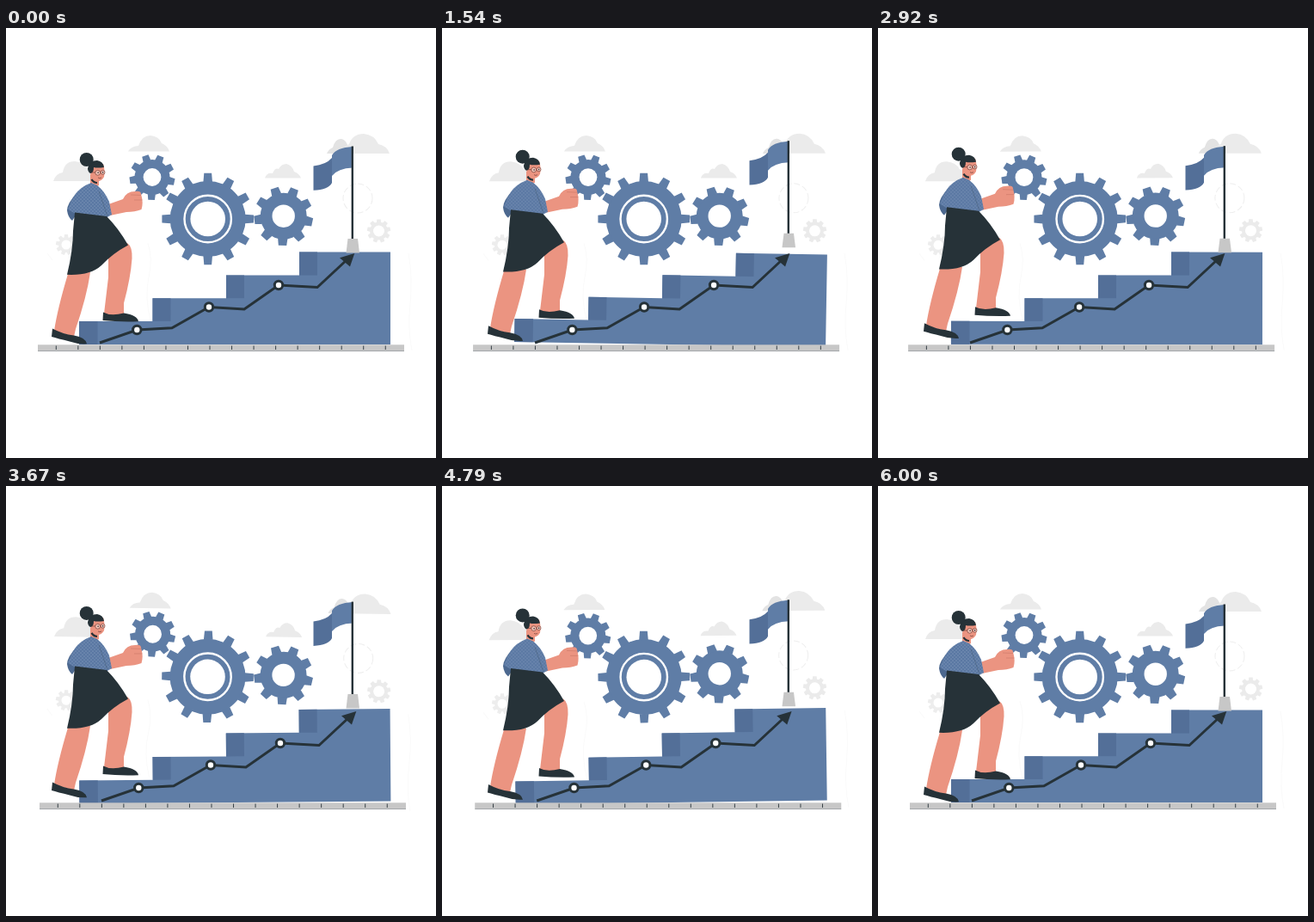
An HTML page that plays this animation: 500 px wide and 500 px high, repeating every 6.04 s.

```html
<!DOCTYPE html>
<html lang="en">
<head>
<meta charset="utf-8">
<title>Climbing the steps</title>
<style>
html, body { margin: 0; width: 100%; height: 100%; overflow: hidden; background: #fff; }
svg { display: block; width: 100vw; height: 100vh; }
.blue { fill: #5f7da6; }
.deep { fill: #536f98; }
.dark { fill: #263238; }
.skin { fill: #eb9481; }
.line { fill: none; stroke: #263238; }
</style>
</head>
<body>
<svg viewBox="0 0 500 500">
  <defs>
    <pattern id="dots" width="4" height="4" patternUnits="userSpaceOnUse">
      <rect width="4" height="4" fill="#5a78a3"/>
      <circle cx="1" cy="1" r=".5" fill="#a9bad3"/>
      <circle cx="3" cy="3" r=".5" fill="#a9bad3"/>
    </pattern>
  </defs>

  <g id="sky">
    <g fill="#ebebeb">
      <path d="M55 178Q58 169 66 168Q68 155 80 155Q91 156 95 164Q103 166 104 178Z"/>
      <path d="M142 143.5Q146 137 154 137Q158 125 168 125Q178 126 181 134Q188 137 190 143.5Z"/>
      <path d="M301 174.5Q303 168 310 169Q313 162 317 164Q320 158 326 158Q333 160 335 167Q341 169 343 174.5Z"/>
      <path d="M373 146Q375 141 380 139Q383 128 390 129Q397 130 400 146Z" fill="#e3e3e3"/>
      <path d="M390 146Q392 138 399 135Q403 123 416 123Q428 124 433 135Q443 137 446 146Z"/>
    </g>
    <g id="faint"></g>
    <circle cx="409" cy="198" r="17" fill="none" stroke="#eee" stroke-dasharray="7 3"/>
    <g fill="none" stroke="#fafafa">
      <path d="M165 250Q171 268 166 290T168 340M48 262L54 270M468 262Q473 290 470 320T472 375"/>
    </g>
  </g>

  <g id="gears"></g>

  <g id="stairs">
    <path class="blue" d="M85 341H170.5V314.3H256V287.4H341V260.5H447V368H85Z"/>
    <path class="deep" d="M85 341h21.5v27H85ZM170.5 314.3h21v26.7h-21ZM256 287.4h21v26.9h-21ZM341 260.5h21v26.9h-21Z"/>
  </g>

  <g id="flag">
    <path class="deep" d="M357.5 160.5Q372 159 379 151V180Q375 188 357.5 188.8Z"/>
    <path class="blue" d="M379 158V148Q384 139 403 138V162.5Q386 163 379 172Z"/>
    <path class="dark" d="M401.6 137.5H404V246H401.6Z"/>
    <path d="M397.5 245H409L411 261.5H395.5Z" fill="#c7c7c7"/>
  </g>

  <g id="ground">
    <rect x="37" y="368.3" width="426" height="7.2" fill="#c7c7c7"/>
    <path id="ticks" class="line" stroke-width=".9"/>
    <path class="line" d="M37 375.6H463" stroke-width=".6" opacity=".6"/>
    <path class="line" d="M109 366L152.5 351L193 348.8L236 324.5L277 327L317 299L362 301.5L398 268" stroke-width="3"/>
    <path class="dark" d="M405.3 262L388 267.3L400 277.5Z"/>
    <g fill="#fff" stroke="#263238" stroke-width="3">
      <circle cx="152.3" cy="351" r="4.7"/>
      <circle cx="236" cy="324.5" r="4.7"/>
      <circle cx="317" cy="299" r="4.7"/>
    </g>
  </g>

  <g id="woman">
    <path class="skin" d="M119 266L141 250Q147 254 146.5 268Q145 290 137 320L137 333Q124 337 114 332L119 290Z"/>
    <path class="dark" d="M113 330.5Q122 335.5 137 331.5Q153 334 154 341.2Q132 342 112.5 340Z"/>
    <path class="skin" d="M72 286L98 284Q94 312 81 350L79 359L56 352Q60 326 72 286Z"/>
    <path class="dark" d="M54 349.5Q66 356 79 357.5Q93 360 94 367.3Q84 368 74 364.5Q60 361 53 359Z"/>

    <path d="M83 191Q71 204 71 212Q72 220 77 224L84 214Z" fill="#4c688f"/>
    <path class="skin" d="M98 170H108V183Q103 187 98 182Z"/>
    <path class="skin" d="M119 205L136 199Q140 190 150 190Q157 189 157 193Q160 203 157.5 211Q150 214 140 214L121 218Z"/>
    <path class="line" d="M145 194L157 194.5M149 200H158.5" stroke="#c66f60" stroke-width=".6" style="stroke:#c97867"/>
    <path d="M99 180Q86 185 80 194Q74 204 72 211L81 216L116 221L123 217L120 202Q115 190 106 183Z" fill="url(#dots)"/>
    <path class="line" d="M108 190Q113 204 118 219" stroke-width=".5" opacity=".45"/>
    <path class="dark" d="M80 214.5L117 219Q131 233 142 252.5Q124 262 111 276Q98 288 71 286.8Q78 258 78 236Z"/>

    <path class="skin" d="M97 162Q102 156 113 158Q115.500 166 114 173Q111 179 105 178Q98 175 97 162Z"/>
    <path class="dark" d="M95 163Q97 154 106 154Q113 155 114 162Q106 163 102 162Q102 169 98 169Q95 167 95 163Z"/>
    <circle class="dark" cx="93.700" cy="153" r="8"/>
    <path class="line" d="M99.500 176Q102 180 106 180" stroke-width="2.200"/>
    <g fill="none" stroke="#743f39" stroke-width=".7">
      <circle cx="106.700" cy="168.300" r="2.900" fill="#f4c1b4"/>
      <circle cx="112.600" cy="167.800" r="2.400" fill="#f4c1b4"/>
      <path d="M100 168H104M107 174Q109 175.500 111 174"/>
    </g>
    <path class="dark" d="M106.500 167.500h1.200v1.600h-1.200ZM112 167h1.200v1.600h-1.200Z"/>
  </g>
</svg>
<script>
const $ = id => document.getElementById(id);

// Gear with a white centre; teeth are spaced evenly from the given angle.
function gear(cx, cy, body, tip, hole, teeth, start, color, half) {
  const tooth = `M${-half * 1.2} ${1 - body}L${-half} ${-tip}H${half}L${half * 1.2} ${1 - body}Z`;
  let parts = `<circle r="${body}"/>`;
  for (let i = 0; i < teeth; i++)
    parts += `<path d="${tooth}" transform="rotate(${start + i * 360 / teeth})"/>`;
  return `<g transform="translate(${cx} ${cy})" fill="${color}">${parts}<circle r="${hole}" fill="#fff"/></g>`;
}

const blue = '#5f7da6';
$('gears').innerHTML =
  gear(170, 173.5, 20.5, 26.3, 10.4, 9, -18, blue, 3.8) +
  gear(322.7, 218.7, 27, 34.2, 13.2, 9, -18, blue, 4.7) +
  gear(234.7, 222, 44, 53.3, 20.3, 12, 0, blue, 4.4) +
  '<circle cx="234.7" cy="222" r="27.2" fill="none" stroke="#fff" stroke-width="2.400"/>';
$('faint').innerHTML =
  gear(70, 252, 9, 12, 5.5, 9, 0, '#ededed', 2) +
  gear(433.5, 236, 10.5, 13.5, 6.5, 9, 0, '#ebebeb', 2.2);

let ticks = '';
for (let i = 0; i < 16; i++) ticks += `M${58.3 + i * 25.53} 369.500V374`;
$('ticks').setAttribute('d', ticks);

// Linear interpolation through [position, value] pairs.
function track(keys, p) {
  const i = keys.findIndex(k => k[0] >= p) || 1;
  const [a, x] = keys[i - 1], [b, y] = keys[i];
  return x + (y - x) * (p - a) / (b - a);
}

const sway = [[0, 0], [.25, 1], [.75, -1], [1, 0]];
const lift = [[0, 0], [.5, -6.5], [1, 0]];
const shake = [0, -.65, 1.3, -2.6, 2.6, -2.6, 2.6, -2.6, 1.3, -.65, 0].map((x, i) => [i / 10, x]);
const set = (id, value) => $(id).setAttribute('transform', value);

function draw() {
  const slow = Math.min(performance.now() % 6040, 6000) / 6000;
  const fast = slow * 2 % 1;
  set('sky', `rotate(${track(sway, fast)} 250 245)`);
  set('gears', `rotate(${track(sway, fast)} 250 211)`);
  set('stairs', `rotate(${track(sway, slow)} 266 314.3)`);
  set('flag', `translate(0 ${track(lift, fast)})`);
  set('woman', `translate(0 ${track(lift, slow)})`);
  set('ground', `translate(${track(shake, slow)} 0)`);
  requestAnimationFrame(draw);
}
draw();
</script>
</body>
</html>
```
